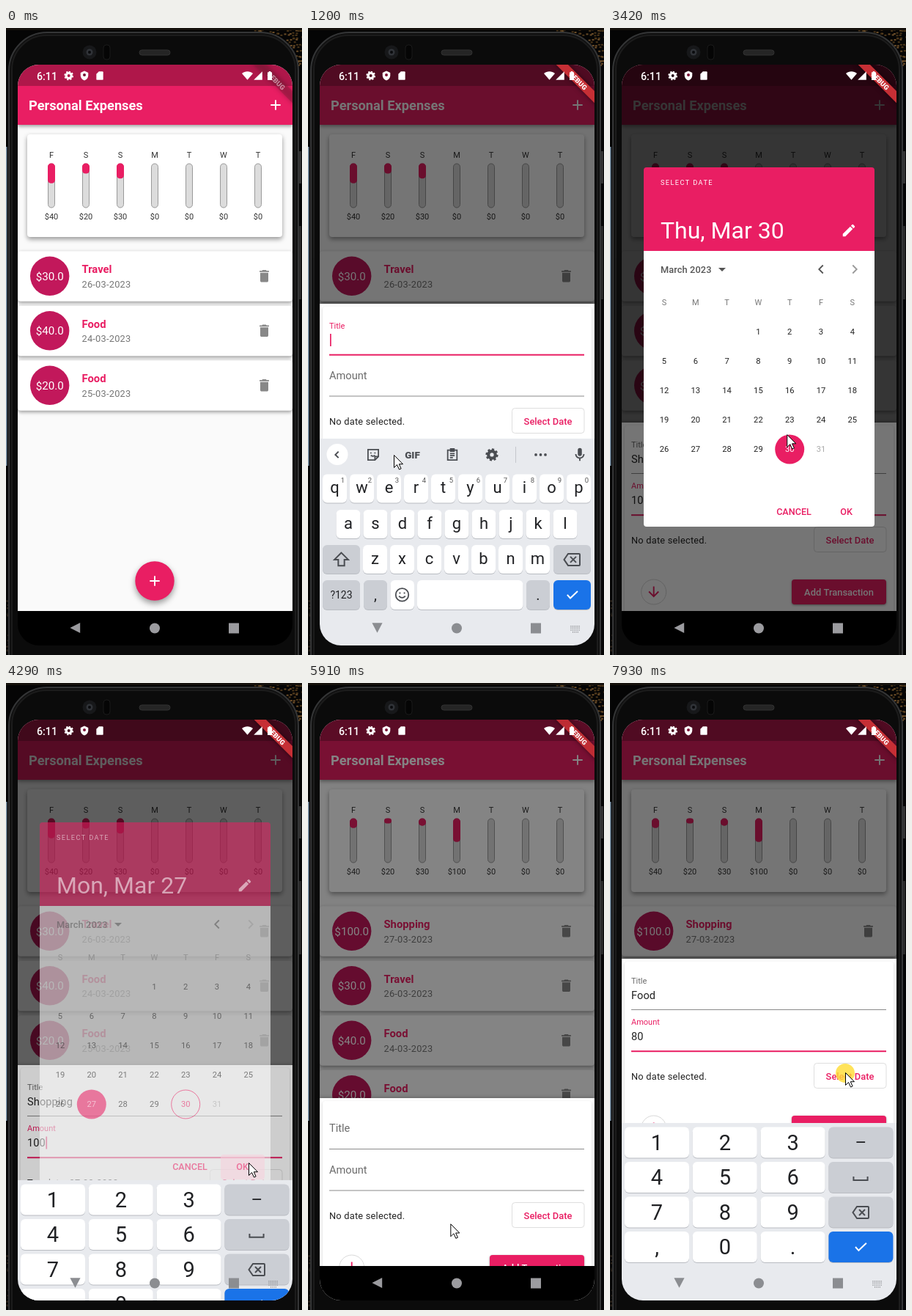
Write an HTML page with a canvas that moves like this. It is 404x855 px and loops after 7.99 s.

```html
<!DOCTYPE html>
<html>
<head>
<meta charset="utf-8">
<style>
html, body { margin: 0; width: 100%; height: 100%; overflow: hidden; background: #000; }
canvas { display: block; }
</style>
</head>
<body>
<canvas id="stage" width="404" height="855"></canvas>
<script>
const ctx = document.getElementById('stage').getContext('2d');
const LOOP = 7990, PINK = '#e91e63', GREY = '#6b6b6b', KEY_INK = '#4a4d52';

const ICON = {
  plus: 'M19 13h-6v6h-2v-6H5v-2h6V5h2v6h6z',
  trash: 'M6 19c0 1.1.9 2 2 2h8c1.1 0 2-.9 2-2V7H6zM19 4h-3.5l-1-1h-5l-1 1H5v2h14z',
  shield: 'M12 1L3 5v6c0 5.5 3.8 10.7 9 12 5.2-1.3 9-6.5 9-12V5z',
  card: 'M18 2h-8L4 8v12a2 2 0 002 2h12a2 2 0 002-2V4a2 2 0 00-2-2z',
  wifi: 'M0 7C7 1.5 17 1.5 24 7L12 21z',
  signal: 'M2 22h20V2z',
  battery: 'M16 4h-2V2h-4v2H8a1 1 0 00-1 1v16a1 1 0 001 1h8a1 1 0 001-1V5a1 1 0 00-1-1z',
  pencil: 'M3 17.2V21h3.8L17.8 9.9l-3.7-3.7zM20.7 7a1 1 0 000-1.4l-2.3-2.3a1 1 0 00-1.4 0l-1.9 1.8 3.8 3.8z',
  erase: 'M7 4h15a1 1 0 011 1v14a1 1 0 01-1 1H7L1.5 12zM10 8l8 8M18 8l-8 8',
  shift: 'M12 3L3 12h5v8h8v-8h5z',
  mic: 'M12 14a3 3 0 003-3V5a3 3 0 00-6 0v6a3 3 0 003 3zm5-3a5 5 0 01-10 0H5c0 3.5 2.6 6.4 6 6.9V21h2v-3.1c3.4-.5 6-3.4 6-6.9z',
  clipboard: 'M4 4h16v17H4zM9 2h6v4H9zM8 10h8M8 13.5h8M8 17h5',
  sticker: 'M3 3h18v12l-6 6H3zM21 15h-6v6M8 8v2M15 8v2M8 13q4 3 7 0',
  smile: 'M22 12a10 10 0 11-20 0 10 10 0 0120 0zM8.5 8v2.5M15.5 8v2.5M7 14q5 5 10 0',
  check: 'M4 12l5 5.5L21 6',
  down: 'M12 4v15M4.5 12l7.5 7.5 7.5-7.5',
  left: 'M15 6l-6 6 6 6',
  right: 'M9 6l6 6-6 6',
  space: 'M2 10v5h20v-5',
  back: 'M20 3.5v17L3.5 12z',
  hide: 'M3.5 4h17L12 20z',
  keys: 'M2 7h20M2 11h20M2 15h20M6 19h12',
  pointer: 'M0 0V17L4 13L7 19.5L9.6 18.4L6.8 12.2H12z'
};
const paths = Object.fromEntries(Object.entries(ICON).map(([k, d]) => [k, new Path2D(d)]));

// Helpers
const clamp = v => Math.max(0, Math.min(1, v));
const easeOut = p => 1 - (1 - p) ** 2;
const smooth = p => p * p * (3 - 2 * p);
const between = (t, a, b) => t >= a && t < b;

function track(t, keys, ease = smooth) {
  let prev = keys[0];
  for (const key of keys) {
    if (t < key[0]) return prev[1] + (key[1] - prev[1]) * ease(clamp((t - prev[0]) / (key[0] - prev[0])));
    prev = key;
  }
  return prev[1];
}
function rect(x, y, w, h, color) { ctx.fillStyle = color; ctx.fillRect(x, y, w, h); }
function box(x, y, w, h, r, fill, stroke, width = 1) {
  ctx.beginPath(); ctx.roundRect(x, y, w, h, r);
  if (fill) { ctx.fillStyle = fill; ctx.fill(); }
  if (stroke) { ctx.strokeStyle = stroke; ctx.lineWidth = width; ctx.stroke(); }
}
function shadow(dy, blur, alpha, draw) {
  ctx.save();
  ctx.shadowColor = `rgba(0,0,0,${alpha})`; ctx.shadowBlur = blur; ctx.shadowOffsetY = dy;
  draw();
  ctx.restore();
}
function disc(x, y, r, fill, stroke, width) { box(x - r, y - r, 2 * r, 2 * r, r, fill, stroke, width); }
function text(s, x, middle, size, color, { weight = 400, align = 'left', gap = 0 } = {}) {
  ctx.font = `${weight} ${size}px Roboto, sans-serif`;
  ctx.letterSpacing = gap + 'px';
  ctx.textAlign = align;
  ctx.fillStyle = color;
  ctx.fillText(s, x, middle + size * .355);
}
const centered = (s, x, y, size, color, weight) => text(s, x, y, size, color, { weight, align: 'center' });
function icon(name, x, y, size, color, line = 0) {
  const k = size / 24;
  ctx.save();
  ctx.translate(x - size / 2, y - size / 2); ctx.scale(k, k);
  ctx.fillStyle = ctx.strokeStyle = color;
  if (line) { ctx.lineWidth = line / k; ctx.stroke(paths[name]); } else ctx.fill(paths[name]);
  ctx.restore();
}
function gear(x, y, r, color) {
  disc(x, y, r * .56, null, color, r * .5);
  ctx.setLineDash([r * .36, r * .31]);
  disc(x, y, r * .86, null, color, r * .3);
  ctx.setLineDash([]);
}

// Phone body and desktop behind it
function drawPhone() {
  rect(0, 0, 404, 855, '#050505');
  let seed = 7;
  const random = () => (seed = seed * 16807 % 2147483647) / 2147483647;
  for (let i = 0; i < 260; i++) {
    const lower = i % 2, x = lower ? random() * 24 : 335 + random() * 69, y = lower ? 780 + random() * 75 : random() * 55;
    rect(x, y, 3, 2, ['#4a3519', '#2a2118', '#6a4c28', '#15130f'][i % 4]);
  }
  rect(0, 0, 404, 3, '#15110c');
  rect(0, 162, 1.5, 435, '#7890a5');
  rect(400, 168, 3, 44, '#333'); rect(400, 270, 3, 100, '#292929');
  box(4, 6, 395, 900, 52, '#101010', '#343536', 2);
  box(8, 10, 387, 900, 47, '#0b0b0b', '#1c1c1c', 2);
  disc(114, 33, 9.5, '#17181a'); disc(114, 33, 4.5, '#303338'); disc(114, 33, 2, '#0a0b0d');
  box(133, 23, 9, 20, 4, '#050505', '#1b1b1b');
  box(182, 30, 42, 7, 3.5, '#252525', '#333');
}

// Main page
const oldItems = [['30', 'Travel', '26'], ['40', 'Food', '24'], ['20', 'Food', '25']];
const newItems = [['100', 'Shopping', '27'], ...oldItems];

function drawPage(t) {
  const added = t >= 5400;
  rect(16, 50, 375, 745, '#fafafa');
  shadow(2, 5, .4, () => rect(16, 79, 375, 53, PINK));
  rect(16, 50, 375, 29, '#af174a');
  text('Personal Expenses', 31, 106, 18.24, '#fff', { weight: 700 });
  icon('plus', 368, 105, 23, '#fff');

  shadow(3, 6, .4, () => box(29, 145, 348, 140, 4, '#fff'));
  const spent = [40, 20, 30, added ? 100 : 0, 0, 0, 0], total = added ? 190 : 90;
  spent.forEach((amount, i) => {
    const x = 62 + 47 * i;
    centered('FSSMTWT'[i], x, 173, 11, '#333');
    box(x - 4.5, 185, 9, 60, 4.5, '#dcdcdc', '#9a9a9a');
    if (amount) box(x - 5, 184.6, 10, 60 * amount / total + .6, 4.5, PINK);
    centered('$' + amount, x, 257, 11, '#333');
  });

  (added ? newItems : oldItems).forEach(([amount, name, day], i) => {
    const y = 338.3 + 74.5 * i;
    shadow(2, 5, .4, () => box(16, y - 34, 375, 68.5, 4, '#fff'));
    disc(59.7, y, 26.7, '#c2185b');
    centered(`$${amount}.0`, 59.7, y, 15.2, '#fff');
    text(name, 103.5, y - 9.2, 14.8, PINK, { weight: 700 });
    text(`${day}-03-2023`, 103.5, y + 11, 12.8, '#757575', { gap: .23 });
    icon('trash', 352.5, y, 22, '#888');
  });

  shadow(4, 8, .4, () => disc(203, 754, 26.7, PINK));
  for (const start of [400, 5700])
    if (between(t, start, start + 250)) disc(203, 754, Math.min(26.7, (t - start) * .2), 'rgba(255,255,255,.2)');
  icon('plus', 203, 754, 23, '#fff');
}

// Bottom sheet form
function drawField(label, value, top, focused, float, caret) {
  const tone = focused ? PINK : GREY;
  text(label, 29, top + 41 - 11 * float, 14.6 - 3.6 * float, float > .5 ? tone : GREY);
  text(value, 29, top + 49.5, 14.6, '#222', { gap: .1 });
  const edge = 30 + ctx.measureText(value).width;
  if (focused && caret) rect(edge - (value ? .5 : 0), top + 41, 1.7, 17, PINK);
  rect(29, top + (focused ? 68.7 : 69), 348, focused ? 2 : 1, focused ? PINK : '#8a8a8a');
}

function drawSheet(t, top) {
  shadow(0, 5, .5, () => rect(16, top, 375, 260, '#fff'));
  shadow(1, 3, .22, () => box(20, top + 4, 367, 280, 4, '#fff'));
  const second = t >= 5740;
  const word = second ? 'Food' : 'Shopping';
  const typed = second ? (t - 6490) / 80 + 1 : (t - 1240) / 48;
  const amount = second ? (t >= 7580 ? '80' : t >= 7370 ? '8' : '')
                        : '100'.slice(0, Math.max(0, Math.floor((t - 2300) / 100)));
  const onTitle = between(t, 800, 2100) || between(t, 5960, 7100);
  const onAmount = between(t, 2100, 4900) || t >= 7100;
  const titleFloat = track(t, [[800, 0], [950, 1], [5740, 1], [5740, 0], [5980, 0], [6130, 1]]);
  const amountFloat = track(t, [[2100, 0], [2250, 1], [5740, 1], [5740, 0], [7100, 0], [7250, 1]]);
  const caret = t < 5000 || between(t, 6290, 7580);
  drawField('Title', word.slice(0, Math.max(0, Math.floor(typed))), top, onTitle, titleFloat, caret);
  drawField('Amount', amount, top + 56.5, onAmount, amountFloat, caret);

  const dated = between(t, 4200, 5740);
  text(dated ? 'Txn date: 27-03-2023' : 'No date selected.', 29, top + 160, 12.8, '#222', { gap: .23 });
  box(278.5, top + 142.5, 98.5, 34, 4, between(t, 2940, 3300) ? '#fce4ec' : '#fff', '#dedede');
  centered('Select Date', 327.5, top + 160, 12.9, PINK, 500);

  disc(59.7, top + 231, 17, '#fff', '#d8d8d8');
  icon('down', 59.7, top + 230.5, 21, PINK, 1.9);
  shadow(1, 3, .4, () => box(248, top + 214, 129, 34, 4, PINK));
  if (between(t, 5360, 5700)) {
    ctx.save();
    ctx.beginPath(); ctx.rect(248, top + 214, 129, 34); ctx.clip();
    disc(316, top + 226, Math.min(75, (t - 5360) * .54), 'rgba(255,255,255,.22)');
    ctx.restore();
  }
  centered('Add Transaction', 312.5, top + 231, 12.9, '#fff', 500);
}

// Date picker
function drawPicker(t, alpha) {
  const picked = t >= 3700 ? 27 : 30;
  ctx.save();
  ctx.globalAlpha = alpha;
  box(46, 190, 315, 114, [4, 4, 0, 0], PINK);
  box(46, 304, 315, 376, [0, 0, 4, 4], '#fff');
  text('SELECT DATE', 69, 210.5, 9.2, '#fff', { gap: 1.4 });
  text(picked === 27 ? 'Mon, Mar 27' : 'Thu, Mar 30', 69, 276, 32, '#fff');
  icon('pencil', 326, 276, 22, '#fff');
  text('March 2023', 69, 329.5, 12.8, '#555', { weight: 500, gap: .1 });
  ctx.beginPath(); ctx.moveTo(148, 327); ctx.lineTo(158, 327); ctx.lineTo(153, 332);
  ctx.fillStyle = '#555'; ctx.fill();
  icon('left', 288, 329, 22, '#555', 1.8);
  icon('right', 334, 329, 22, '#999', 1.8);
  for (let i = 0; i < 7; i++) centered('SMTWTFS'[i], 74 + 42.8 * i, 374, 11, '#777');
  for (let day = 1; day <= 31; day++) {
    const x = 74 + 42.8 * ((day + 2) % 7), y = 414 + 40 * Math.floor((day + 2) / 7);
    if (day === picked) disc(x, y + .5, 20, PINK);
    else if (day === 30) disc(x, y + .5, 19.5, null, PINK);
    centered(day, x, y, 11.2, day === picked ? '#fff' : day === 30 ? PINK : day > 30 ? '#aaa' : '#222');
  }
  if (t >= 4150) box(293, 643, 60, 34, 4, '#f8d0dc');
  centered('CANCEL', 251, 660, 12.6, PINK, 500);
  centered('OK', 322.5, 660, 12.6, PINK, 500);
  ctx.restore();
}

// Keyboards
function key(x, y, w, h, label, size, kind) {
  const fill = { tool: '#cbced4', enter: '#1a73e8' }[kind] || '#fff';
  box(x, y + 1, w, h, 6, '#b9bcc2');
  box(x, y, w, h, 6, fill);
  if (label) centered(label, x + w / 2, y + h / 2, size, '#202124');
}
function letterRow(chars, left, y, hints) {
  [...chars].forEach((c, i) => {
    const x = left + 37 * i;
    key(x, y, 33, 39, null);
    centered(c, x + 16.5, y + 18, 22, '#202124');
    if (hints) centered((i + 1) % 10, x + 27.5, y + 8, 9.5, '#555');
  });
}
function drawLetters(top) {
  const bar = top + 22;
  disc(40, bar - .5, 14.5, '#fff');
  icon('left', 39.5, bar, 17, KEY_INK, 2);
  icon('sticker', 89, bar, 19, KEY_INK, 1.8);
  centered('GIF', 142.5, bar, 13.5, KEY_INK, 900);
  icon('clipboard', 197, bar, 19, KEY_INK, 1.8);
  gear(251, bar, 8.5, KEY_INK);
  rect(283, bar - 11, 1, 22, '#c4c7cc');
  for (const x of [311, 317.5, 324]) disc(x, bar, 1.9, KEY_INK);
  icon('mic', 371, bar, 22, KEY_INK);

  letterRow('qwertyuiop', 20, top + 48.5, true);
  letterRow('asdfghjkl', 38.5, top + 97);
  letterRow('zxcvbnm', 75, top + 145);
  key(20, top + 145, 51, 39, '', 0, 'tool'); icon('shift', 45.5, top + 165, 25, KEY_INK, 2);
  key(335, top + 145, 51, 39, '', 0, 'tool'); icon('erase', 360, top + 165, 24, KEY_INK, 2);
  const last = top + 193;
  key(20, last, 51, 40, '?123', 14, 'tool');
  key(76, last, 32, 40, ',', 20, 'tool');
  key(112.5, last, 32.5, 40); icon('smile', 128.5, last + 20, 21, KEY_INK, 1.8);
  key(149, last, 144.5, 40);
  key(298, last, 32, 40, '.', 20, 'tool');
  key(335, last, 51, 40, '', 0, 'enter'); icon('check', 360.5, last + 20, 20, '#fff', 2);
}
function drawDigits(top) {
  ['123–', '456 ', '789 ', ',0. '].forEach((row, r) => [...row].forEach((c, i) => {
    const x = 20 + 92.8 * i, y = top + 5.5 + 47.5 * r;
    key(x, y, 88, 42, c.trim(), c === '–' ? 24 : 29, i < 3 ? '' : r < 3 ? 'tool' : 'enter');
  }));
  icon('space', 342, top + 75, 23, KEY_INK, 2);
  icon('erase', 342, top + 122, 24, KEY_INK, 2);
  icon('check', 342, top + 169, 21, '#fff', 2);
}
function drawSystemBar(keyboardTop, numeric) {
  const open = keyboardTop < 835, ink = open ? '#8b8d91' : '#9b9b9f';
  rect(16, 795, 375, 48, '#000');
  if (open) {
    rect(16, keyboardTop, 375, 843 - keyboardTop, '#e8eaee');
    (numeric ? drawDigits : drawLetters)(keyboardTop);
    icon('keys', 365, 819, 17, ink, 0.01);
    ctx.setLineDash([1.6, 1.8]);
    icon('keys', 365, 819, 16, ink, 1.5);
    ctx.setLineDash([]);
  }
  icon(open ? 'hide' : 'back', 94.5, 818, 20, ink);
  disc(203, 818.5, 7, ink);
  rect(304, 811.5, 14, 14, ink);
}

function drawStatus(scrim) {
  ctx.save();
  ctx.translate(391, 50); ctx.rotate(Math.PI / 4);
  ctx.globalAlpha = .5 + .5 * scrim;
  shadow(0, 6, .5, () => rect(-40, 25.5, 80, 11.5, scrim > .5 ? '#c62f35' : '#8e1d3c'));
  centered('DEBUG', 0, 31.5, 9.3, '#fff', 900);
  ctx.restore();
  text('6:11', 42, 65.5, 14.2, '#fff', { weight: 500 });
  gear(85.7, 65, 6.3, '#fff');
  icon('shield', 107, 65, 14, '#fff'); disc(107, 64, 2, '#7a0f35');
  icon('card', 128, 65, 14, '#fff');
  icon('wifi', 329.5, 65, 15, '#fff');
  icon('signal', 344, 65, 14, '#fff');
  icon('battery', 360, 65, 14.5, '#fff');
}

// Mouse: time, x, y
const route = [
  [70, 198, 774], [260, 201, 756], [700, 201, 756], [1130, 117, 582], [1880, 117, 582],
  [2050, 150, 484], [2200, 150, 484], [2610, 327, 549], [2810, 327, 549], [2940, 327, 539],
  [3250, 327, 539], [3640, 117, 576], [3880, 117, 576], [4140, 331, 654], [4690, 331, 654],
  [4830, 95, 814], [4950, 95, 814], [5290, 318, 754], [5500, 318, 754], [5680, 203, 752],
  [5850, 203, 752], [6190, 101, 579], [6290, 100, 571], [6490, 100, 571], [6770, 327, 538],
  [7040, 327, 538], [7340, 321, 531]
];
const clicks = [400, 2060, 3010, 3700, 4150, 4840, 5355, 5690, 7925];

function drawMouse(t) {
  if (t < 70) return;
  const x = track(t, route.map(p => [p[0], p[1]])), y = track(t, route.map(p => [p[0], p[2]]));
  if (clicks.some(c => between(t, c, c + 70))) disc(x, y + 1, 13, 'rgba(255,220,50,.8)');
  ctx.save();
  ctx.translate(x + .5, y + .5);
  ctx.fillStyle = '#fff'; ctx.strokeStyle = '#000'; ctx.lineWidth = 1;
  ctx.fill(paths.pointer); ctx.stroke(paths.pointer);
  ctx.restore();
}

function draw(t) {
  const sheetTop = track(t, [
    [450, 795], [700, 538], [780, 538], [1000, 376], [3150, 376], [3400, 538], [4230, 538], [4290, 521],
    [4480, 376], [4860, 376], [5120, 538], [5500, 538], [5690, 795], [5760, 795], [5950, 538], [5990, 538], [6150, 376]
  ]);
  const keyboardTop = track(t, [
    [780, 842], [1070, 562], [1200, 560], [1270, 557], [2180, 557], [2180, 600], [3130, 600], [3360, 842],
    [4200, 842], [4290, 679], [4440, 600], [4850, 600], [5080, 842], [5960, 842], [6180, 557], [7180, 557], [7180, 600]
  ], easeOut);
  const picker = track(t, [[3080, 0], [3230, 1], [4220, 1], [4290, .56], [4380, 0]], p => p);
  const pickerScrim = track(t, [[3080, 0], [3230, .54], [4220, .54], [4290, .2], [4380, 0]], p => p);
  const scrim = clamp((795 - sheetTop) / 257);
  const numeric = between(t, 2180, 5500) || t >= 7180;

  drawPhone();
  ctx.save();
  ctx.beginPath(); ctx.roundRect(16, 50, 375, 792, 29); ctx.clip();
  drawPage(t);
  if (scrim) {
    rect(16, 50, 375, 745, `rgba(0,0,0,${.54 * scrim})`);
    drawSheet(t, sheetTop);
  }
  if (picker) {
    rect(16, 50, 375, 745, `rgba(0,0,0,${pickerScrim})`);
    drawPicker(t, picker);
  }
  drawSystemBar(keyboardTop, numeric);
  drawStatus(scrim);
  ctx.restore();
  drawMouse(t);
}

const began = performance.now();
function tick() {
  draw((performance.now() - began) % LOOP);
  requestAnimationFrame(tick);
}
tick();
</script>
</body>
</html>
```
